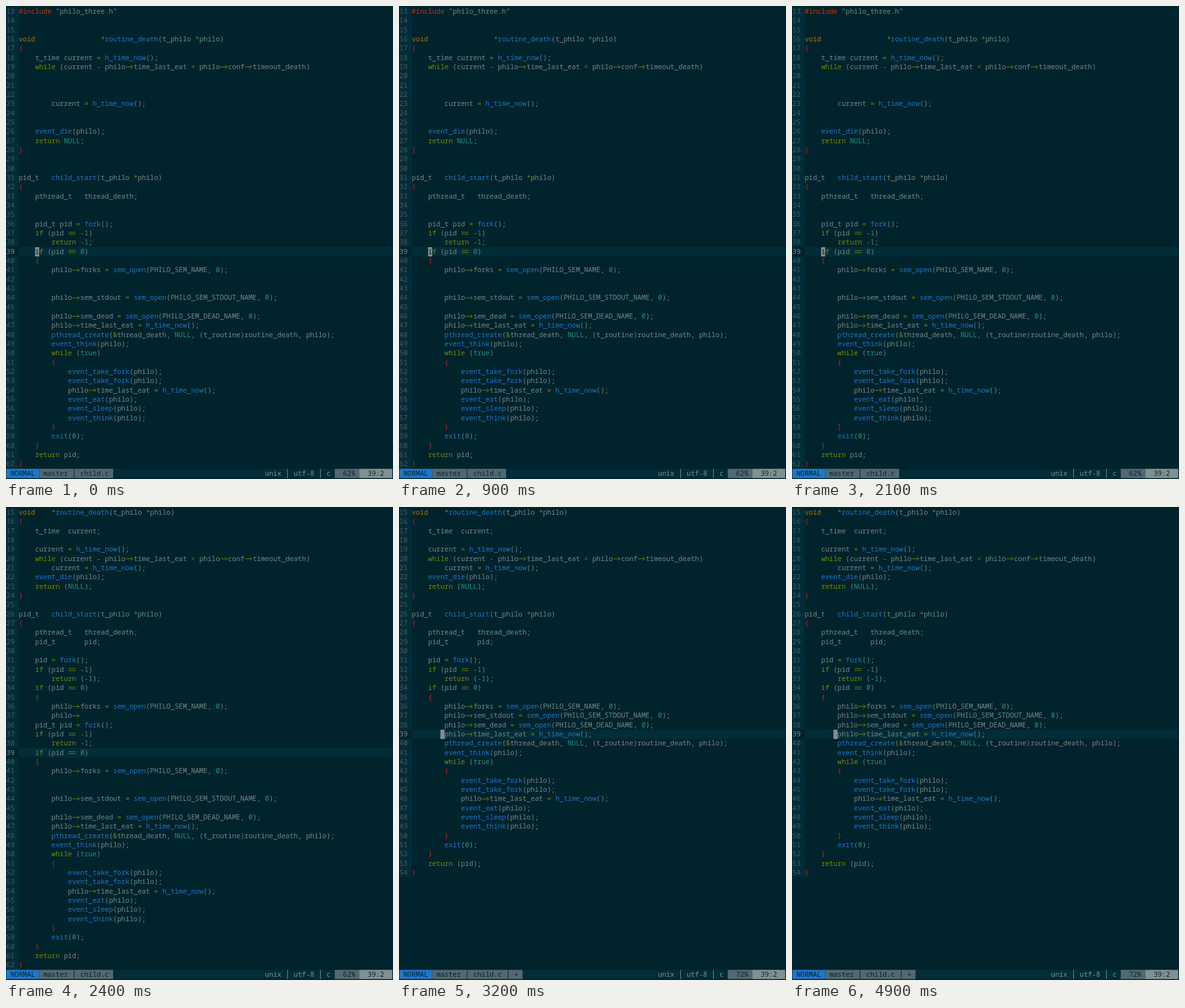
An HTML page that plays this animation: 600x734 px, repeating every 5 s.

```html
<!DOCTYPE html>
<html lang="en">
<head>
<meta charset="utf-8">
<style>
  html, body { margin: 0; width: 100%; height: 100%; overflow: hidden; background: #00232c; }
  svg { display: block; width: 600px; height: 734px; }
  text { font: 500 10.6px "Noto Sans Mono", "DejaVu Sans Mono", monospace; white-space: pre; }
</style>
</head>
<body>
<svg id="stage" viewBox="0 0 600 734"></svg>
<script>
const LOOP = 5000, CELL = 6.364, ROW = 14.333, LEFT = 0.6, TOP = 1.6, GUTTER = 3, ROWS = 50;
const color = {
  bg: '#00232c', panel: '#022d38', faint: '#0d3842',
  dim: '#475b62', bar: '#536870', text: '#768788', light: '#819090',
  blue: '#2176c7', green: '#738a05', yellow: '#a57706',
  red: '#d11c24', orange: '#bd3613', cyan: '#259286'
};

const sharedBody = `        event_think(philo);
        while (true)
        {
            event_take_fork(philo);
            event_take_fork(philo);
            philo->time_last_eat = h_time_now();
            event_eat(philo);
            event_sleep(philo);
            event_think(philo);
        }
        exit(0);
    }`;

const before = `#include "philo_three.h"


void                *routine_death(t_philo *philo)
{
    t_time current = h_time_now();
    while (current - philo->time_last_eat < philo->conf->timeout_death)



        current = h_time_now();


    event_die(philo);
    return NULL;
}


pid_t   child_start(t_philo *philo)
{
    pthread_t   thread_death;


    pid_t pid = fork();
    if (pid == -1)
        return -1;
    if (pid == 0)
    {
        philo->forks = sem_open(PHILO_SEM_NAME, 0);


        philo->sem_stdout = sem_open(PHILO_SEM_STDOUT_NAME, 0);

        philo->sem_dead = sem_open(PHILO_SEM_DEAD_NAME, 0);
        philo->time_last_eat = h_time_now();
        pthread_create(&thread_death, NULL, (t_routine)routine_death, philo);
${sharedBody}
    return pid;
}`;

const after = `void    *routine_death(t_philo *philo)
{
    t_time  current;

    current = h_time_now();
    while (current - philo->time_last_eat < philo->conf->timeout_death)
        current = h_time_now();
    event_die(philo);
    return (NULL);
}

pid_t   child_start(t_philo *philo)
{
    pthread_t   thread_death;
    pid_t       pid;

    pid = fork();
    if (pid == -1)
        return (-1);
    if (pid == 0)
    {
        philo->forks = sem_open(PHILO_SEM_NAME, 0);
        philo->sem_stdout = sem_open(PHILO_SEM_STDOUT_NAME, 0);
        philo->sem_dead = sem_open(PHILO_SEM_DEAD_NAME, 0);
        philo->time_last_eat = h_time_now();
        pthread_create(&thread_death, NULL, (t_routine)routine_death, philo);
${sharedBody}
    return (pid);
}`;

const numbered = (source, first) =>
  source.split('\n').map((code, i) => ({ number: first + i, code }));

const escapeText = s => s.replace(/&/g, '&amp;').replace(/</g, '&lt;');
const colLeft = col => LEFT + col * CELL;
const rowTop = row => TOP + row * ROW;

function block(col, row, cols, fill, rows = 1) {
  return `<rect x="${colLeft(col)}" y="${rowTop(row)}" width="${cols * CELL}" height="${rows * ROW}" fill="${fill}"/>`;
}

function label(col, row, str, fill) {
  return `<text x="${colLeft(col)}" y="${rowTop(row) + 10.4}" fill="${fill}">${escapeText(str)}</text>`;
}

// Two-cell ligatures for "->" and "=="
function ligature(col, row, token) {
  const x = colLeft(col), y = rowTop(row) + 7;
  const d = token === '->'
    ? `M${x + 0.6} ${y}h10.6m-3 -2.9l3 2.9l-3 2.9`
    : `M${x + 1} ${y - 1.5}h10.7m0 3h-10.7`;
  return `<path d="${d}" fill="none" stroke="${color.green}" stroke-width=".9"/>`;
}

function tokenColor(token, next) {
  if (token === '#include') return color.orange;
  if (token === 'void') return color.yellow;
  if (/^(if|while|return|[-*=<&])$/.test(token)) return color.green;
  if (/^(NULL|true|\d+)$/.test(token)) return color.cyan;
  if (/^[{}]$/.test(token)) return color.red;
  return /^\w/.test(token) && next === '(' ? color.blue : color.text;
}

function codeLine(code, row) {
  return [...code.matchAll(/#?\w+|"[^"]*"|->|==|[(),;]+|\S/g)].map(({ 0: token, index }) => {
    const col = GUTTER + index;
    return token === '->' || token === '=='
      ? ligature(col, row, token)
      : label(col, row, token, tokenColor(token, code[index + token.length]));
  }).join('');
}

function statusBar(percent, modified) {
  const row = ROWS, ink = color.bg;
  const divider = (col, fill) =>
    `<rect x="${colLeft(col + 0.5) - 0.4}" y="${rowTop(row)}" width=".9" height="${ROW}" fill="${fill}"/>`;
  return block(0, row, 94, color.panel) +
    block(0, row, 8, color.blue) + label(1, row, 'NORMAL', ink) +
    block(8, row, modified ? 22 : 18, color.bar) +
    label(9, row, 'master', ink) + divider(16, ink) + label(18, row, 'child.c', ink) +
    (modified ? divider(26, ink) + label(28, row, '+', ink) : '') +
    label(63, row, 'unix', color.light) + divider(68, color.light) +
    label(70, row, 'utf-8', color.light) + divider(76, color.light) +
    label(78, row, 'c', color.light) +
    block(80, row, 6, color.bar) + label(82, row, percent, ink) +
    block(86, row, 8, color.light) + label(88, row, '39:2', ink);
}

function screen(lines, activeRow, status, cursor = '') {
  let out = block(0, 0, GUTTER, color.panel, lines.length) +
    block(0, activeRow, 94, color.panel) + block(0, activeRow, GUTTER, color.bg);
  for (let row = 0; row < ROWS; row++) {
    const line = lines[row];
    out += line
      ? label(0, row, String(line.number), row === activeRow ? color.light : color.dim) + codeLine(line.code, row)
      : label(0, row, '~', color.faint);
  }
  return `<g>${out}${cursor}${status}</g>`;
}

const oldLines = numbered(before, 13), newLines = numbered(after, 15);
const partial = [...newLines.slice(0, 22), { number: 37, code: '        philo->' }, ...oldLines.slice(23)];

const stage = document.getElementById('stage');
stage.innerHTML =
  screen(oldLines, 26, statusBar('62%', false),
    block(7, 26, 1, color.light) + label(7, 26, 'i', color.bg)) +
  screen(partial, 26, statusBar('62%', false)) +
  screen(newLines, 24, statusBar('72%', true), block(10, 24, 1, color.light));

function draw() {
  const t = performance.now() % LOOP;
  const current = t < 2400 ? 0 : t < 2500 ? 1 : 2;
  [...stage.children].forEach((group, i) => { group.style.display = i === current ? '' : 'none'; });
  requestAnimationFrame(draw);
}
draw();
</script>
</body>
</html>
```
